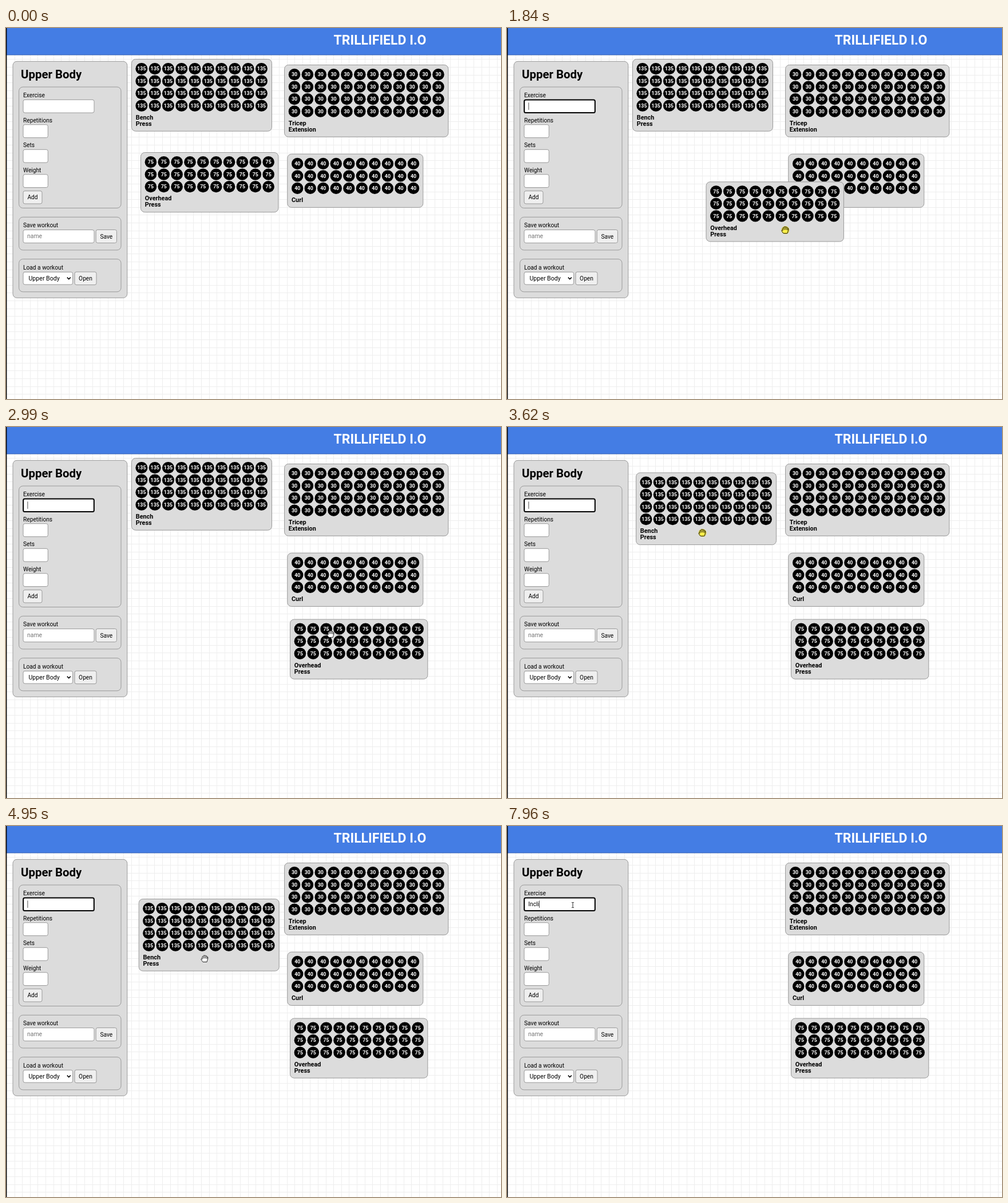
Write an HTML page with a canvas that moves like this. It is 865 px wide and 648 px high and loops after 8 s.

```html
<!DOCTYPE html>
<html lang="en">
<head>
<meta charset="utf-8">
<title>Workout board</title>
<style>
  html, body { margin: 0; width: 100%; height: 100%; overflow: hidden; background: #fff; }
  canvas { display: block; width: 865px; height: 648px; }
</style>
</head>
<body>
<canvas id="stage" width="865" height="648"></canvas>
<script>
const ctx = document.getElementById('stage').getContext('2d');
const LOOP = 8000, W = 865, H = 648;
const FONT = 'Roboto, Arial, sans-serif';
const GREY = '#dcdcdc', EDGE = '#999';

const ease = {
  smooth: p => p * p * (3 - 2 * p),
  out: p => 1 - (1 - p) ** 2.2,
  line: p => p
};

// Keys are [time, x, y, easing into this key]; equal times make a jump.
function along(keys, t) {
  if (t < keys[0][0]) return keys[0].slice(1, 3);
  for (let i = keys.length - 1; i >= 0; i--) {
    const a = keys[i], b = keys[i + 1];
    if (t < a[0]) continue;
    if (!b) return a.slice(1, 3);
    const p = ease[b[3] || 'smooth']((t - a[0]) / (b[0] - a[0]));
    return [a[1] + (b[1] - a[1]) * p, a[2] + (b[2] - a[2]) * p];
  }
}

const within = (t, spans) => spans.some(([a, b]) => t >= a && t < b);

const pressPath = [
  [1510, 235.5, 217.5], [1570, 237, 218.5, 'line'], [2170, 496.5, 336],
  [2220, 499.5, 339, 'out'], [2390, 499.5, 339], [2390, 496.5, 336]
];
const benchPath = [
  [3570, 219.5, 54.5], [3620, 225.5, 79.5, 'line'], [4160, 235, 180, 'out'],
  [4430, 235, 180], [4430, 232.2, 127.5], [5000, 232.2, 127.5], [5740, 235, 191]
];
const pointerPath = [
  [450, 862, 646], [1230, 376, 303], [1510, 375, 302], [1570, 376, 303, 'line'],
  [2170, 633, 419], [2220, 636, 422, 'out'], [2390, 636, 422], [2390, 633, 419],
  [2760, 633, 419], [3520, 335, 159], [3570, 335, 159], [3620, 341, 184, 'line'],
  [4160, 350, 284, 'out'], [4430, 350, 284], [4430, 347, 231.5], [5000, 347, 231.5],
  [5740, 350, 295], [5930, 350, 295], [6530, 115, 153, 'out'], [6660, 115, 138]
];

const REMOVED = 5930;
const presses = [[1280, 2390], [3540, 4430], [5010, 5780]];
const focusSpans = [[1510, REMOVED], [6850, LOOP]];
const caretSpans = [[1510, 2390], [2910, 3430], [3570, 4430], [4950, 5470], [6850, 7360], [7450, LOOP]];
const keyTimes = [7450, 7650, 7730, 7880, 7960];

const cards = [
  { label: ['Bench', 'Press'], num: 135, cols: 10, rows: 4, w: 245, pill: 21, pitch: 23.28,
    at: t => along(benchPath, t), until: REMOVED },
  { label: ['Tricep', 'Extension'], num: 30, cols: 12, rows: 4, w: 286.3, pill: 20.6, pitch: 22.86,
    at: () => [486.6, 64.5] },
  { label: ['Curl'], num: 40, cols: 10, rows: 3, w: 237, pill: 20.4, pitch: 22.53,
    at: () => [491.8, 220.2] },
  { label: ['Overhead', 'Press'], num: 75, cols: 10, rows: 3, w: 240.4, pill: 20.6, pitch: 22.86,
    at: t => along(pressPath, t) }
];
const cardHeight = c => 17.7 + c.rows * 21.5 + c.label.length * 11;

function text(str, x, y, size, { weight = 400, color = '#000', align = 'left' } = {}) {
  ctx.font = `${weight} ${size}px ${FONT}`;
  ctx.fillStyle = color;
  ctx.textAlign = align;
  ctx.fillText(str, x, y);
}

function box(x, y, w, h, r, fill, stroke = EDGE, line = 1) {
  ctx.beginPath();
  ctx.roundRect(x, y, w, h, r);
  ctx.fillStyle = fill;
  ctx.fill();
  ctx.strokeStyle = stroke;
  ctx.lineWidth = line;
  ctx.stroke();
}

function button(str, x, y, w, h) {
  box(x, y, w, h, 3, '#efefef');
  text(str, x + w / 2, y + h / 2 + 3.6, 10.2, { align: 'center' });
}

function drawPage() {
  ctx.fillStyle = '#fff';
  ctx.fillRect(0, 0, W, H);
  ctx.fillStyle = '#eeeeee';
  for (let x = 14.6; x < W; x += 13.6) ctx.fillRect(Math.round(x), 47, 1, H);
  for (let y = 54.4; y < H; y += 13.6) ctx.fillRect(0, Math.round(y), W, 1);
  ctx.fillStyle = '#447de4';
  ctx.fillRect(0, 0, W, 47);
  ctx.fillStyle = '#3260b4';
  ctx.fillRect(0, 46.5, W, 1);
  ctx.fillStyle = '#000';
  ctx.fillRect(0, 0, 1.4, H);
  text('TRILLIFIELD I.O', 653.5, 28.8, 23, { weight: 700, color: '#fff', align: 'center' });
}

function drawPanel(t) {
  box(12, 58.3, 199.8, 413, 7, GREY);
  text('Upper Body', 26, 87.5, 20.4, { weight: 700 });
  for (const [y, h] of [[103, 211.5], [330.3, 57.6], [403.6, 57.2]]) box(22.6, y, 178.4, h, 7, GREY);

  ['Exercise', 'Repetitions', 'Sets', 'Weight'].forEach((s, i) => {
    const y = 121 + i * 43.5;
    text(s, 30, y, 10.2);
    box(30, y + 4.3, i ? 43.3 : 124, 22.8, 3, '#fff');
  });
  button('Add', 30, 284.6, 33, 22.4);

  text('Save workout', 30, 348, 10.2);
  box(30, 352.6, 124, 22.8, 3, '#fff');
  text('name', 37, 367.2, 10.4, { color: '#757575' });
  button('Save', 157.2, 352.4, 36.2, 23);

  text('Load a workout', 30, 421.5, 10.2);
  box(30, 426.3, 86.6, 21.8, 3, '#fff');
  text('Upper Body', 39.5, 440.7, 10.6);
  ctx.beginPath();
  ctx.moveTo(106.8, 435.6);
  ctx.lineTo(109.8, 438.6);
  ctx.lineTo(112.8, 435.6);
  ctx.strokeStyle = '#000';
  ctx.lineWidth = 1.5;
  ctx.stroke();
  button('Open', 120, 426, 38, 22.6);

  if (within(t, focusSpans)) box(30.2, 125.5, 123.6, 22.4, 2.5, '#fff', '#000', 2);
  const typed = 'Incli'.slice(0, keyTimes.filter(k => t >= k).length);
  text(typed, 37.3, 140.3, 10.2);
  if (within(t, caretSpans)) {
    ctx.fillStyle = '#222';
    ctx.fillRect(37.5 + ctx.measureText(typed).width, 130.3, 0.8, 12.6);
  }
}

function drawCard(c, t) {
  const [x, y] = c.at(t);
  box(x, y, c.w, cardHeight(c), 7, GREY);
  for (let r = 0; r < c.rows; r++) {
    for (let k = 0; k < c.cols; k++) {
      const cx = x + 17.4 + k * c.pitch, cy = y + 16.7 + r * 21.5;
      ctx.beginPath();
      ctx.roundRect(cx - c.pill / 2, cy - 10.1, c.pill, 20.2, 10.1);
      ctx.fillStyle = '#000';
      ctx.fill();
      text(c.num, cx, cy + 3.2, 8.84, { weight: 700, color: '#fff', align: 'center' });
    }
  }
  c.label.forEach((s, i) => text(s, x + 7.2, y + 19.4 + c.rows * 21.5 + i * 11, 10.88, { weight: 700 }));
}

const arrow = new Path2D('M0 0V11.2L2.6 8.8L4.3 12.8L6.2 12L4.5 8.1H8Z');
const hand = new Path2D('M-3 6L-6 1.8Q-6.4 -.6 -3.9 1L-4.3 -2.8Q-3.4 -4.6 -2.3 -2.8L-2 -4.8' +
  'Q-.9 -6.6 .2 -4.9Q1.4 -6.6 2.5 -4.4Q3.9 -5 4.6 -3Q6.2 -3.2 5.9 -.6L4.8 3L4 6Z' +
  'M-2.2 -3L-1.8 0M.2 -5V-.2M2.5 -4.4L2.3 0M4.6 -3L4.2 .4');
const beam = new Path2D('M-2 -4.5H-.5L0 -4L.5 -4.5H2M0 -4V4M-2 4.5H-.5L0 4L.5 4.5H2');

function pointerShape(x, y, live, t) {
  const inside = (bx, by, w, h) => x >= bx && x <= bx + w && y >= by && y <= by + h;
  if (live.some(c => inside(...c.at(t), c.w, cardHeight(c)))) return hand;
  return inside(30, 125, 124, 23.5) ? beam : arrow;
}

function drawPointer(live, t) {
  if (t < 450) return;
  const [x, y] = along(pointerPath, t);
  const shape = pointerShape(x, y, live, t);
  ctx.save();
  ctx.translate(x, y);
  ctx.lineWidth = 0.9;
  ctx.lineJoin = 'round';
  ctx.strokeStyle = '#111';
  ctx.fillStyle = '#fff';
  if (shape !== beam) ctx.fill(shape);
  ctx.stroke(shape);
  const press = presses.find(([a, b]) => t >= a && t < b);
  if (press) {
    const p = Math.min(1, (t - press[0]) / 80);
    ctx.globalCompositeOperation = 'multiply';
    ctx.fillStyle = '#fff04a';
    ctx.beginPath();
    ctx.arc(0.5, 0.5, 10 - 3 * p, 0, Math.PI * 2);
    ctx.fill();
  }
  ctx.restore();
}

function frame(now) {
  const t = now % LOOP;
  const live = cards.filter(c => !c.until || t < c.until);
  drawPage();
  drawPanel(t);
  live.forEach(c => drawCard(c, t));
  drawPointer(live, t);
  requestAnimationFrame(frame);
}
requestAnimationFrame(frame);
</script>
</body>
</html>
```
